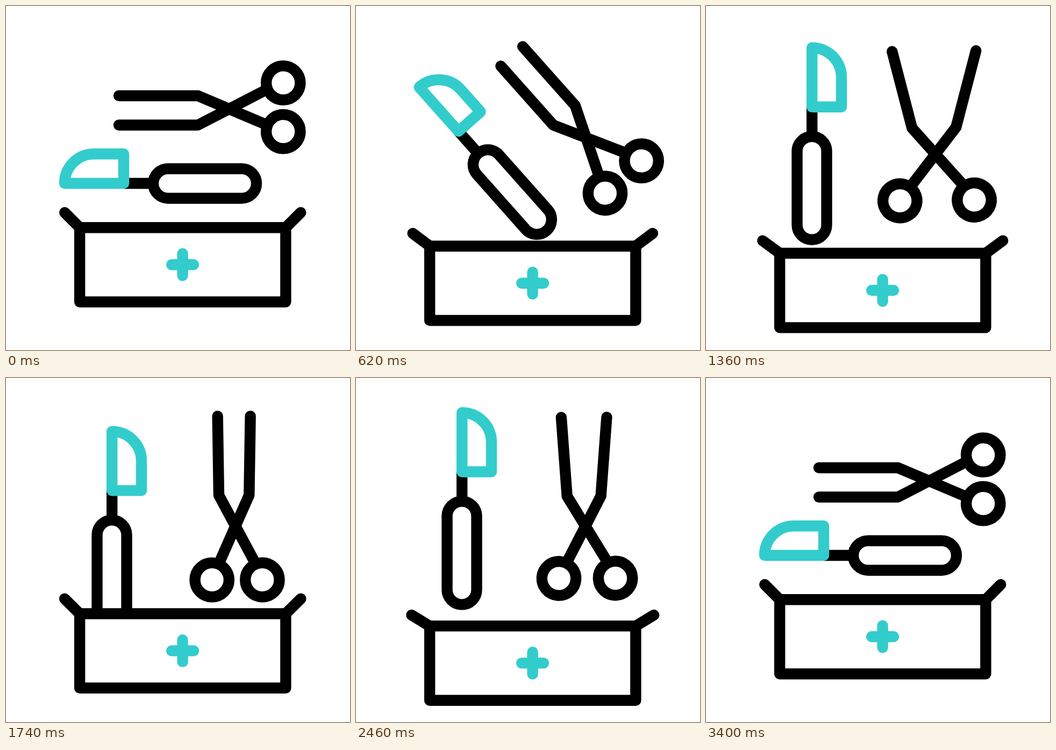
These frames come from a looping animation (640x640 px, 3620 ms). An HTML page:

```html
<!DOCTYPE html>
<html lang="en">
<head>
<meta charset="utf-8">
<title>Surgical tools</title>
<style>
  html, body { margin: 0; height: 100%; overflow: hidden; background: #fff; }
  svg { display: block; width: 100vw; height: 100vh; }
  g { fill: none; stroke: #000; stroke-width: 20.4; stroke-linecap: round; stroke-linejoin: round; }
  .teal { stroke: #3cc; }
</style>
</head>
<body>
<svg viewBox="0 0 640 640">
  <g id="scissors">
    <g id="armA">
      <path d="M210 167H357L482 219.9"/>
      <circle cx="515.8" cy="233.6" r="31.7"/>
    </g>
    <g id="armB">
      <path d="M210 221.5H357L482 157"/>
      <circle cx="515.8" cy="143.1" r="31.7"/>
    </g>
  </g>
  <g id="scalpel">
    <path d="M219 330H274" stroke-linecap="butt"/>
    <rect x="274" y="302.7" width="192" height="55" rx="27.5"/>
    <path class="teal" d="M109 330H219V275.2H163.8A54.8 54.8 0 0 0 109 330Z"/>
  </g>
  <g id="box">
    <path id="lipL" d="M137.1 412.2L109.2 384.3"/>
    <path id="lipR" d="M520.4 412.2L548.3 384.3"/>
    <rect x="137.1" y="412.2" width="383.3" height="138.3" fill="#fff"/>
    <path class="teal" d="M308.2 481.2H349M328.6 460.8V501.6"/>
  </g>
</svg>
<script>
const LOOP = 3620, STEP = 20;
const el = id => document.getElementById(id);
const set = (id, value) => el(id).setAttribute('transform', value);

// Eased value at a tick, with keys spaced evenly from the start tick
function track(tick, start, gap, keys) {
  const pos = Math.min(Math.max((tick - start) / gap, 0), keys.length - 1);
  const i = Math.min(Math.floor(pos), keys.length - 2);
  const u = pos - i;
  return keys[i] + (keys[i + 1] - keys[i]) * u * u * (3 - 2 * u);
}

function draw(tick) {
  const main = (...keys) => track(tick, 10, 40, keys);
  const turn = main(0, 90, 90, 90, 0);
  const lip = main(0, 15, 0, 15, 0);
  const snip = track(tick, 50, 20, [0, 15, 0, 15, 0]);

  set('scissors', `translate(${main(0, 51.6, 51.6, 51.6, 0)} ${main(0, 51.1, 51.1, 51.1, 0)}) rotate(${turn} 378.7 188.1)`);
  set('armA', `rotate(${snip} 415 191.4)`);
  set('armB', `rotate(${-snip} 415 191.4)`);
  set('scalpel', `translate(${main(0, -76.5, -76.5, -76.5, 0)} ${main(0, -76.9, -38.3, -76.9, 0)}) rotate(${turn} 287.2 316.5)`);
  set('box', `translate(0 ${main(0, 64.2, 25.7, 51.3, 0)})`);
  set('lipL', `rotate(${-lip} 137.1 412.2)`);
  set('lipR', `rotate(${lip} 520.4 412.2)`);
}

const begin = performance.now();
function loop() {
  draw(Math.floor((performance.now() - begin) % LOOP / STEP));
  requestAnimationFrame(loop);
}
loop();
</script>
</body>
</html>
```
